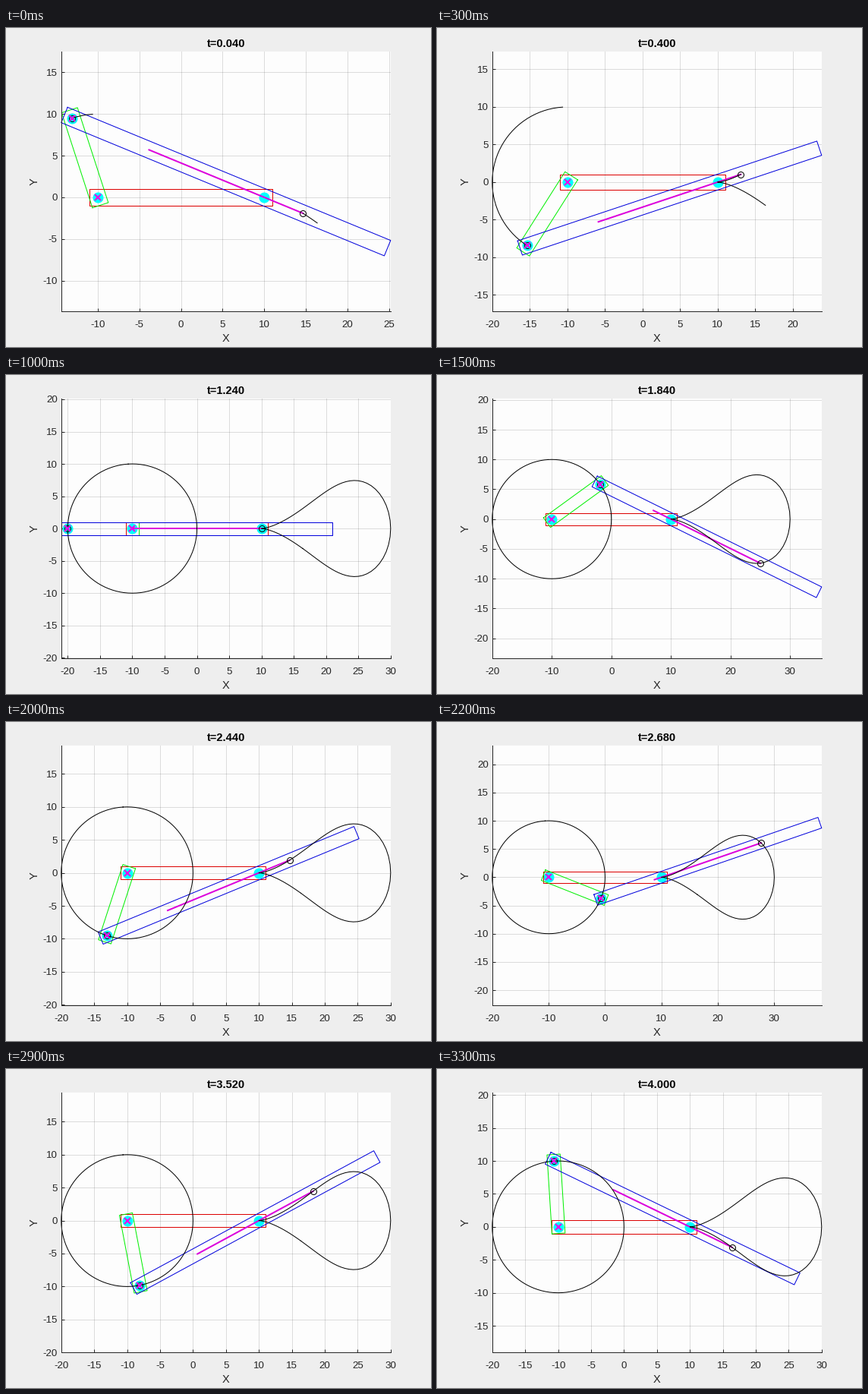
Animation of 560x420 px, one loop 3400 ms. Source, as a matplotlib script:

```python
import numpy as np
import matplotlib.pyplot as plt
from matplotlib.animation import FuncAnimation
from matplotlib.ticker import FuncFormatter, MultipleLocator

W, H, DPI = 560, 420, 80
PX = 72 / DPI                      # points per pixel
AX_X, AX_Y, AX_W, AX_H = 72.8, 46.7, 434, 342.3
FRAMES, STEP, T0 = 34, 0.12, 0.04
INK = "#262626"

plt.rcParams["font.family"] = "Liberation Sans"
plt.rcParams["axes.unicode_minus"] = False

PIVOT = np.array([-10.0, 0.0])
GUIDE = np.array([10.0, 0.0])
CRANK, ROD = 10, 40


def linkage(t):
    """Crank direction, crank pin and rod direction at time t."""
    a = 2 * np.pi * (np.asarray(t) + 0.26)
    crank = np.stack([np.cos(a), np.sin(a)], axis=-1)
    pin = PIVOT + CRANK * crank
    rod = GUIDE - pin
    return crank, pin, rod / np.linalg.norm(rod, axis=-1, keepdims=True)


def bar(start, u, length):
    """Closed outline of a bar with a margin of 1 around its axis."""
    n = np.array([-u[1], u[0]])
    a, b = start - u, start + (length + 1) * u
    return np.array([a + n, b + n, b - n, a - n, a + n])


fig = plt.figure(figsize=(W / DPI, H / DPI), dpi=DPI, facecolor="#eeeeee")
ax = fig.add_axes([AX_X / W, AX_Y / H, AX_W / W, AX_H / H],
                  facecolor="#fdfdfd")
ax.spines[["top", "right"]].set_visible(False)
for side in ("left", "bottom"):
    ax.spines[side].set(color=INK, linewidth=PX)
ax.set_axisbelow(True)
ax.grid(color=INK, alpha=0.15, linewidth=PX)
ax.tick_params(direction="in", length=4.3 * PX, width=PX, color=INK,
               labelcolor=INK, labelsize=13.33 * PX)
ax.tick_params(axis="x", pad=11.3 * PX)
ax.tick_params(axis="y", pad=5 * PX)
for axis in (ax.xaxis, ax.yaxis):
    axis.set_major_formatter(FuncFormatter(lambda v, _: f"{round(v)}"))
ax.yaxis.set_major_locator(MultipleLocator(5))


def label(x, y, s, **kw):
    return fig.text(x / W, 1 - y / H, s, fontsize=14.67 * PX, ha="center",
                    va="baseline", rotation_mode="anchor", **kw)


def line(color, width=1.0, **kw):
    return ax.plot([], [], color=color, lw=width * PX, clip_on=False, **kw)[0]


def marks(shape, color, size, edge, fill="none"):
    return line(color, ls="none", marker=shape, ms=size * PX, mew=edge * PX,
                mfc=fill, mec=color)


title = label(290, 25, "", weight="bold", color="black")
label(290, 413, "X", color=INK)
label(41.8, 202.5, "Y", color=INK, rotation=90)

joints = marks("o", "#00ffff", 13, 1, "#00ffff")
base = line("#dc0000")
crank_bar = line("#00f000")
rod_bar = line("#0000dc")
slider = line("#dc00dc", 2)
pin_path, tip_path = line("black"), line("black")
rings = marks("o", "black", 8, 1)
crosses = marks("x", "#f000e6", 8, 2)


def update(i):
    t = T0 + STEP * i
    crank, pin, u = linkage(t)
    # The paths close after one turn.
    turn = min(t, 1)
    _, pins, us = linkage(np.linspace(0, turn, round(turn / 0.01) + 1))
    tip = pin + 30 * u
    shapes = {
        base: bar(PIVOT, np.array([1.0, 0.0]), 20),
        crank_bar: bar(PIVOT, crank, CRANK),
        rod_bar: bar(pin, u, ROD),
        slider: np.array([pin + 10 * u, tip]),
        joints: np.array([PIVOT, GUIDE, pin]),
        crosses: np.array([PIVOT, pin]),
        pin_path: pins,
        tip_path: pins + 30 * us,
        rings: np.array([pin, tip]),
    }
    for artist, pts in shapes.items():
        artist.set_data(pts[:, 0], pts[:, 1])

    # Equal scaling: tight around the data, centred in the spare direction.
    pts = np.vstack(list(shapes.values()))
    lo, hi = pts.min(axis=0), pts.max(axis=0)
    mid, span = (lo + hi) / 2, hi - lo
    unit = max(span[0] / AX_W, span[1] / AX_H)
    ax.set_xlim(mid[0] - unit * AX_W / 2, mid[0] + unit * AX_W / 2)
    ax.set_ylim(mid[1] - unit * AX_H / 2, mid[1] + unit * AX_H / 2)
    ax.xaxis.set_major_locator(MultipleLocator(5 if unit * AX_W < 54 else 10))
    title.set_text(f"t={t:.3f}")
    return [*shapes, title]


anim = FuncAnimation(fig, update, frames=FRAMES, interval=100,
                     repeat=True, repeat_delay=0, blit=False)
plt.show()
```
